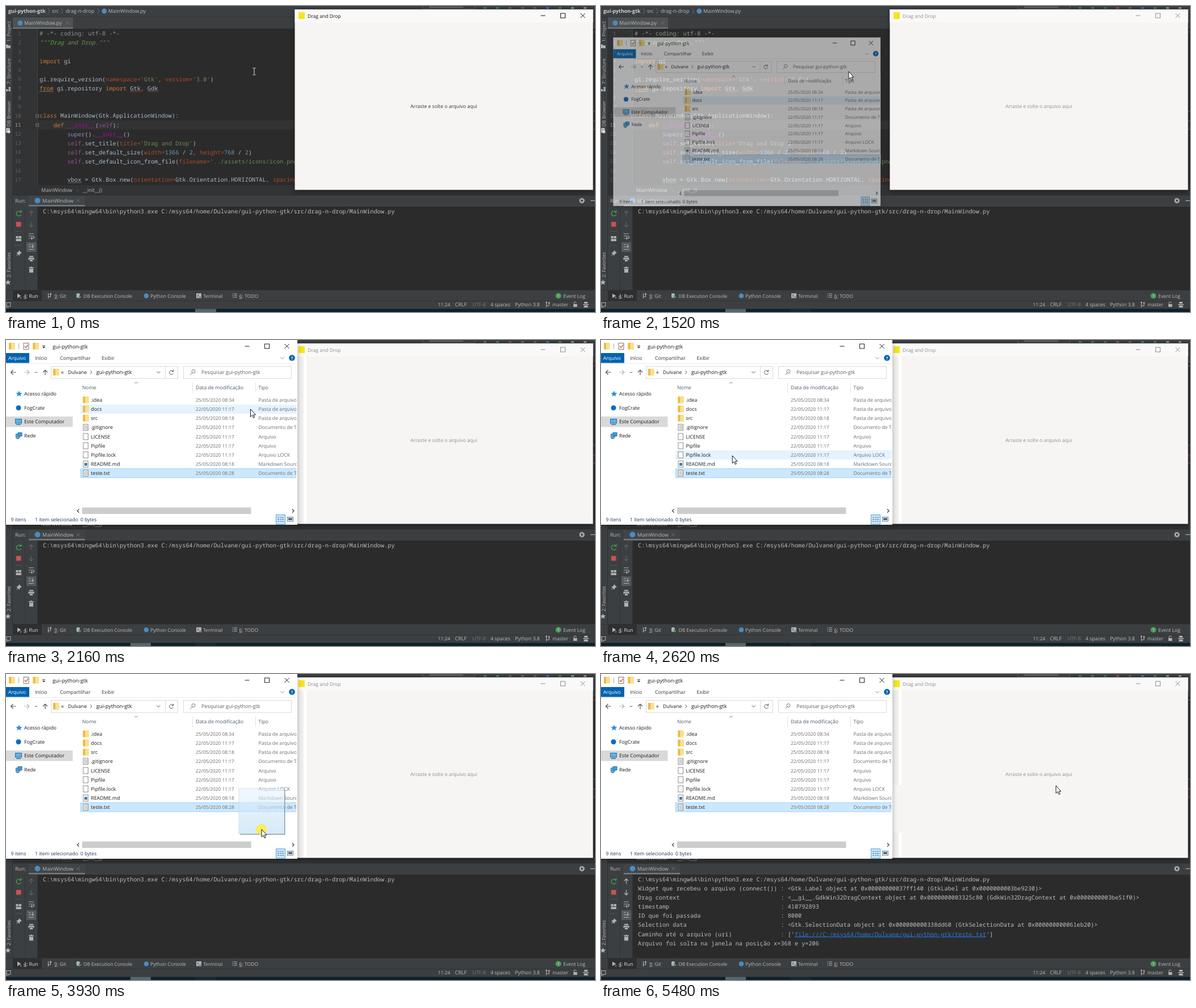
These frames come from a looping animation (1037 px wide and 540 px high, 6.56 s). An HTML page:

```html
<!DOCTYPE html>
<html lang="pt">
<head>
<meta charset="utf-8">
<title>Drag and Drop</title>
<style>
  html, body { margin: 0; width: 100%; height: 100%; overflow: hidden; background: #2b2b2b; }
  svg { display: block; width: 100vw; height: 100vh; }
  text { font-family: "Open Sans", "Noto Sans", sans-serif; text-rendering: geometricPrecision; white-space: pre; }
  .mono { font-family: "Noto Sans Mono", "DejaVu Sans Mono", monospace; }
</style>
</head>
<body>
<svg id="stage" viewBox="0 0 1037 540" xmlns="http://www.w3.org/2000/svg"></svg>
<script>
const LOOP = 6560;
const UI = '#bbbbbb', PANEL = '#3c3f41', EDITOR = '#2b2b2b', ICON = '#afb1b3';
const USER = 'Dulvane', CLOUD = 'FogCrate', RECORDER = 'PanelToReel';
const PROJECT = 'gui-python-gtk';
const MONO = 10.23, LINE = 16.12;

// Drawing helpers; text is placed by the vertical middle of its line.
const esc = s => s.replace(/&/g, '&amp;').replace(/</g, '&lt;').replace(/ /g, '\u00a0');
const rect = (x, y, w, h, fill, more = '') => `<rect x="${x}" y="${y}" width="${w}" height="${h}" fill="${fill}" ${more}/>`;
const box = (x, y, w, h, stroke, fill = 'none') => rect(x, y, w, h, fill, `stroke="${stroke}"`);
const dot = (x, y, r, fill) => `<circle cx="${x}" cy="${y}" r="${r}" fill="${fill}"/>`;
const line = (d, stroke, width = 1) => `<path d="${d}" fill="none" stroke="${stroke}" stroke-width="${width}"/>`;
const shape = (d, fill) => `<path d="${d}" fill="${fill}"/>`;
const text = (x, y, s, fill = UI, size = 8.75, more = '') =>
  `<text x="${x}" y="${y + 3.1}" fill="${fill}" font-size="${size}" ${more}>${esc(s)}</text>`;
const keyed = (x, y, s, fill, size) =>
  `<text x="${x}" y="${y + 3.1}" fill="${fill}" font-size="${size}"><tspan text-decoration="underline">${s[0]}</tspan>${esc(s.slice(1))}</text>`;
const upward = (y, s) =>
  `<text transform="translate(7.5 ${y}) rotate(-90)" fill="${UI}" font-size="8.4">${esc(s)}</text>`;

const INK = {
  c: 'fill="#909394"', d: 'fill="#629755" font-style="italic"', k: 'fill="#cc7832"', s: 'fill="#6a8759"',
  a: 'fill="#aa4926"', p: 'fill="#94558d"', m: 'fill="#b200b2"', b: 'fill="#8888c6"', n: 'fill="#6897bb"',
  l: 'fill="#287bde" text-decoration="underline"'
};
// Marked-up line: {k word} paints "word" with INK.k.
const code = (x, y, s, fill = '#a9b7c6') =>
  `<text class="mono" x="${x}" y="${y + 3.5}" fill="${fill}" font-size="${MONO}">` +
  s.split(/(\{\w [^}]*\})/).map(part => {
    const m = part.match(/^\{(\w) ([^}]*)\}$/);
    return m ? `<tspan ${INK[m[1]]}>${esc(m[2])}</tspan>` : esc(part);
  }).join('') + '</text>';

function wave(x, end, y, color) {
  let d = `M${x} ${y}`;
  for (let i = 1; x + i * 1.5 <= end; i++) d += `L${x + i * 1.5} ${y + (i % 2 ? -1.5 : 0)}`;
  return line(d, color, 0.8);
}

const folder = (x, y) => rect(x, y, 10.5, 11.5, '#f8d775') + rect(x, y, 4, 11.5, '#e9bb4a') + rect(x + 4, y + 1, 6.5, 10.5, '#fbe08c');
const page = (x, y) => box(x + 1, y, 8.5, 11, '#8b8b8b', '#fff');
const chevron = (x, y, c, r = 3) => line(`M${x - r} ${y - r / 2}l${r} ${r}l${r} ${-r}`, c);
const windowButtons = (x, y, c) => line(`M${x} ${y}h8`, c) +
  box(x + 35, y - 4, 8, 8, c) + line(`M${x + 70} ${y - 4}l8 8m0 -8l-8 8`, c);

const LINES = [
  '{c # -*- coding: utf-8 -*-}', '{d """Drag and Drop."""}', '', '{k import} gi', '',
  "gi.require_version({a namespace=}{s 'Gtk'}{k , }{a version=}{s '3.0'})",
  '{k from} gi.repository {k import} Gtk{k ,} Gdk', '', '',
  '{k class} MainWindow(Gtk.ApplicationWindow):',
  '    {k def} {m __init__}({p self}):',
  '        {b super}().{m __init__}()',
  "        {p self}.set_title({a title=}{s 'Drag and Drop'})",
  '        {p self}.set_default_size({a width=}{n 1366} / {n 2}{k , }{a height=}{n 768} / {n 2})',
  "        {p self}.set_default_icon_from_file({a filename=}{s '../assets/icons/icon.png'})",
  '',
  '        vbox = Gtk.Box.new({a orientation=}Gtk.Orientation.HORIZONTAL{k , }{a spacing=}{n 10})'
];

function editor() {
  let s = rect(12, 40, 1025, 293, EDITOR) + rect(12, 40, 43, 293, '#313335') + rect(12, 202, 1025, 16, '#323232');
  s += line('M55.5 40V316', '#47494b', 0.8);
  LINES.forEach((row, i) => {
    const y = 48.8 + i * LINE;
    s += `<text class="mono" x="26.5" y="${y + 3}" text-anchor="end" font-size="9.2" fill="${i === 10 ? '#a4a3a3' : '#606366'}">${i + 1}</text>`;
    if (row) s += code(59, y, row);
  });
  s += [194, 210].map(y => box(52.5, y - 2.5, 5, 5, '#6c6e70', EDITOR) + line(`M53.5 ${y}h3`, '#8a8c8e', 0.8)).join('');
  s += wave(59, 84, 151.5, '#a89f80') + wave(219, 237, 151.5, '#d0504c') + wave(250, 268, 151.5, '#d0504c') + wave(109, 133, 312.5, '#659c6b');
  s += rect(12, 316, 1025, 17, '#313335') + text(62, 325, 'MainWindow', UI, 9) + text(125, 325, '›', '#777', 9) + text(135, 325, '__init__()', UI, 8.9);
  return s + [45, 185, 202, 217].map(y => rect(1034, y, 3, 1.5, '#9e3a36')).join('');
}

function topBars() {
  let s = text(4, 9, PROJECT, '#d0d0d0', 8.95, 'font-weight="700"');
  s += text(81, 9, 'src') + text(105, 9, 'drag-n-drop', UI, 9.05) + dot(173, 9, 4.5, '#4b8bbe') + text(180, 9, 'MainWindow.py', UI, 8.95);
  s += [75, 98, 162].map(x => line(`M${x - 1} 4l3 5l-3 5`, '#77797b', 0.8)).join('');
  s += line('M0 19.5H1037', '#323232') + rect(12, 20, 106, 20, '#4e5254') + rect(12, 38, 106, 2.5, '#747a80');
  s += dot(25, 30, 4.5, '#4b8bbe') + text(32, 30, 'MainWindow.py', UI, 8.95) + line('M106 27.5l5 5m0 -5l-5 5', '#77797b', 0.8);
  s += box(733.5, -8, 92, 13, '#5e6062') + rect(745, 1, 60, 2, '#8a8c8e', 'opacity=".5"');
  const tips = ['#499c54', '#499c54', '#6e7072', '#c75450', '#6e7072', '#3592c4', '#499c54', ICON, ICON];
  return s + tips.map((c, i) => rect(841 + i * 22, 2, 5, 3, c, 'opacity=".7"')).join('');
}

function sideStripe() {
  let s = line('M11.5 20V501', '#323232') + upward(63, '1: Project') + upward(138, '7: Structure') + upward(213, 'DB Browser') + upward(479, '2: Favorites');
  s += shape('M0 68h3l1 1.5h4v5H0z', ICON) + rect(0, 147, 3.5, 3.5, ICON) + rect(4.5, 143, 3.5, 3.5, ICON) + rect(4.5, 147, 3.5, 3.5, ICON);
  s += rect(0, 215, 7, 9, ICON, 'rx="2"') + dot(5, 222, 2.5, '#e0e0e0');
  return s + shape('M3.5 482.5l1.4 3.4 3.6.2-2.8 2.4 1 3.6-3.2-2-3.2 2 1-3.6-2.8-2.4 3.6-.2z', ICON);
}

function runPanel() {
  let s = rect(12, 333, 1025, 1.5, '#292b2d') + rect(12, 334, 1025, 20, PANEL) + rect(40, 335, 99, 18, '#414547') + rect(40, 351, 99, 2.5, '#747a80');
  s += text(16, 343.5, 'Run:', UI, 9) + dot(55.5, 343.5, 5, '#4b8bbe') + text(64, 343.5, 'MainWindow', UI, 9) + line('M124.5 341l5 5m0 -5l-5 5', '#77797b', 0.8);
  s += `<circle cx="1014" cy="343.5" r="3" fill="none" stroke="${ICON}" stroke-width="2.2"/>` +
    `<circle cx="1014" cy="343.5" r="4.6" fill="none" stroke="${ICON}" stroke-dasharray="1.8 1.8"/>` + line('M1029 343.5h8', ICON, 1.2);
  s += rect(56, 354, 981, 147, EDITOR) + line('M33.5 356V501M55.5 354V501', '#323232') + line('M16 397.5h12M16 422.5h12', '#515456');
  s += line('M26 363.5a4.3 4.3 0 1 0 .5 4.5', '#499c54', 1.4) + shape('M23 364.5h4.5v-4.5z', '#499c54') + rect(18, 381, 8.5, 8.5, '#c75450');
  s += rect(17.5, 406, 4, 4, ICON) + rect(22.5, 406, 4.5, 4, ICON) + rect(17.5, 411, 9.5, 4, ICON);
  s += shape('M23 431l5 5-2 .5-2 2v2.5l-2.5-2.5-4 3 3-4-2.5-2.5h2.5l2-2z', ICON);
  s += `<g id="arrows" fill="none" stroke-width="1.3"><path d="M44.5 370.5v-9m-3.5 3.5l3.5-3.5 3.5 3.5M44.5 381v9m-3.5-3.5l3.5 3.5 3.5-3.5"/></g>`;
  s += line('M40 402h9M40 406h7.5a2 2 0 0 1 0 4h-3M40 410h2m4-2l-2 2 2 2', ICON, 1.2);
  s += rect(36, 417, 17, 17, '#55595c') + line('M40 421h4M40 425h4M40 429.5h9M47 420v6m-2-2l2 2 2-2', ICON, 1.2);
  s += rect(41, 441, 7, 2, ICON) + rect(39.5, 444, 10, 4, ICON) + rect(41.5, 447, 6, 4, ICON, `stroke="${PANEL}" stroke-width=".8"`);
  s += rect(40, 461, 9, 1.5, ICON) + rect(43, 460, 3, 1, ICON) + rect(41, 463.5, 7, 7, ICON);
  const path = `home/${USER}/${PROJECT}`;
  s += code(65, 362.3, `C:\\msys64\\mingw64\\bin\\python3.exe C:/msys64/${path}/src/drag-n-drop/MainWindow.py`, UI);
  const out = [
    ['Widget que recebeu o arquivo (connect())', '<Gtk.Label object at 0x00000000037ff140 (GtkLabel at 0x0000000003be9230)>'],
    ['Drag context', '<__gi__.GdkWin32DragContext object at 0x0000000003325c80 (GdkWin32DragContext at 0x0000000003be51f0)>'],
    ['timestamp', '410792893'],
    ['ID que foi passada', '8000'],
    ['Selection data', '<Gtk.SelectionData object at 0x000000000338dd60 (GtkSelectionData at 0x000000000061eb20)>'],
    ['Caminho até o arquivo (uri)', `['{l file:///C:/msys64/${path}/teste.txt}']`]
  ].map(([name, value]) => `${name.padEnd(41)}: ${value}`);
  out.push('Arquivo foi solta na janela na posição x=368 e y=206');
  return s + '<g id="output">' + out.map((row, i) => code(65, 362.3 + (i + 1) * LINE, row, UI)).join('') + '</g>';
}

function bottomBars() {
  let s = line('M0 501.5H1037M0 520.5H1037', '#323232') + rect(12, 502, 51, 18, '#2d2f30');
  s += shape('M20 507.5l6.5 4-6.5 4z', ICON) + dot(26, 515, 1.5, '#499c54') + keyed(31, 511.5, '4: Run', '#e0e0e0', 8.7);
  s += line('M74.5 507v9M74.5 513h4v-5M77 509l1.5-2 1.5 2', ICON, 1.2) + keyed(85, 511.5, '9: Git', UI, 8.6);
  s += rect(124, 507, 6, 8, ICON, 'rx="2"') + shape('M128 510.5l5 3-5 3z', '#499c54') + text(136.5, 511.5, 'DB Execution Console', UI, 8.45);
  s += dot(247, 511.5, 4.3, '#4b8bbe') + text(254, 511.5, 'Python Console', UI, 8.64);
  s += rect(335, 507, 9, 8.5, ICON) + line('M337 509l2 2-2 2m3.5 .5h2.5', PANEL) + text(347, 511.5, 'Terminal', UI, 8.5);
  s += line('M398.5 508h1.5m1 0h6M398.5 511h1.5m1 0h6M398.5 514h1.5m1 0h6', ICON, 1.2) + keyed(410.5, 511.5, '6: TODO', UI, 8.6);
  s += dot(972.5, 511.5, 5, '#499c54') + text(970.7, 511.2, '1', '#fff', 7) + text(981, 511.5, 'Event Log', UI, 8.64);
  s += box(1, 523.5, 7, 6.5, ICON) + line('M0 527v5h5', ICON, 0.8);
  s += text(760.5, 527, '11:24', UI, 8.5) + text(790.5, 527, 'CRLF', UI, 9.1) + text(821, 527, 'UTF-8', '#777', 8.9);
  s += text(853, 527, '4 spaces', UI, 8.75) + text(896, 527, 'Python 3.8', UI, 8.85) + text(962, 527, 'master', UI, 8.5);
  s += line('M951.5 522.5v9M951.5 529h4.5v-5', ICON, 1.1) + dot(951.5, 523, 1.4, ICON) + dot(956, 524, 1.4, ICON);
  s += rect(999, 526, 6.5, 5, ICON) + line('M1000 526v-2a2 2 0 0 1 4 0', ICON) + shape('M1016 526h10v1.5h-10zM1018 522h6v3h-6zM1018 528.5h6l1 3.5h-8z', ICON);
  s += rect(0, 534.5, 1037, 6, '#10202b') + rect(333, 534.5, 37, 6, '#56646c', 'id="taskA"') + rect(219, 534.5, 36, 6, '#56646c', 'id="taskB"');
  return s + text(965, 542.5, '08:28', '#d8d8d8', 8.6);
}

function gtkWindow() {
  return rect(508.5, 6, 525, 318.5, '#f6f5f4') + rect(508.5, 6, 525, 23, '#faf9f9') + rect(515, 11, 11, 12, '#f7e51e') +
    `<g id="gtkTitle">${text(531, 17.5, 'Drag and Drop', 'currentColor', 8.55)}${windowButtons(941.5, 17, 'currentColor')}</g>` +
    `<g id="gtkLabel">${text(712, 176.5, 'Arraste e solte o arquivo aqui', 'currentColor', 8.62)}</g>`;
}

const FILES = [
  ['.idea', '25/05/2020 08:34', 'Pasta de arquivos'], ['docs', '22/05/2020 11:17', 'Pasta de arquivos'],
  ['src', '25/05/2020 08:18', 'Pasta de arquivos'], ['.gitignore', '22/05/2020 11:17', 'Documento de Texto'],
  ['LICENSE', '22/05/2020 11:17', 'Arquivo'], ['Pipfile', '22/05/2020 11:17', 'Arquivo'],
  ['Pipfile.lock', '22/05/2020 11:17', 'Arquivo LOCK'], ['README.md', '25/05/2020 08:18', 'Markdown Source'],
  ['teste.txt', '25/05/2020 08:28', 'Documento de Texto']
];
const rowY = i => 105.8 + i * 16.15;

function fileIcon(i, y) {
  if (i < 3) return folder(135.5, y - 6);
  let s = page(135, y - 5.5);
  if (i === 3 || i === 8) s += line(`M137.5 ${y - 3}h6m-6 2h6m-6 2h6m-6 2h6`, '#8f8f8f', 0.8);
  if (i === 7) s += rect(138, y - 2, 5, 5, '#3b7fa8');
  return s;
}

function explorer() {
  const dark = '#1a1a1a', gray = '#6d6d6d', edge = '#d9d9d9';
  let s = rect(-3, 0, 516, 326, '#fff');
  s += folder(5, 5) + line('M22.5 6v10', '#aaa') + box(31, 5.5, 9, 11, '#777', '#fff') + line('M33 11l2 2.5 4-5', '#d2552d', 1.3) + folder(47.5, 5);
  s += line('M64 10h5', dark) + shape('M64 12h5l-2.5 2.5z', dark) + text(82, 11.5, PROJECT, dark, 9.2) + windowButtons(420.5, 11, dark);
  s += rect(-3, 23, 44, 17.5, '#0063b1') + text(4, 32, 'Arquivo', '#fff', 8.6) + text(51, 32, 'Início', '#333', 8.7) + text(95, 32, 'Compartilhar', '#333', 8.7) + text(168.5, 32, 'Exibir', '#333', 8.7);
  s += chevron(486.5, 32, '#888') + dot(503.5, 31.5, 5.3, '#0063b1') + text(501.7, 31.5, '?', '#fff', 7.5, 'font-weight="700"') + line('M0 41.5H513', '#ececec');
  s += line('M17.5 57h-9m4-4l-4 4 4 4', '#555', 1.2) + line('M32 57h9m-4-4l4 4-4 4', '#b5b5b5', 1.2) + chevron(53, 57, '#555', 2) + line('M69 62v-9m-4 4l4-4 4 4', '#555', 1.2);
  s += box(79.5, 46.5, 223, 21.5, edge) + line('M280.5 47v21', edge) + folder(83, 51) + text(97, 56.5, '«', dark, 9.5) + text(109, 56.8, USER, dark, 8.7);
  s += line('M148.5 54l2.5 3-2.5 3', '#555') + text(159, 56.8, PROJECT, dark, 9.25) + chevron(268.5, 57, '#555') + line('M294.5 55.5a3.6 3.6 0 1 0 .2 3M294.7 52.5v3.2h-3', '#555');
  s += box(312.5, 46.5, 190, 21.5, edge) + '<circle cx="330" cy="55.5" r="3" fill="none" stroke="#777"/>' + line('M327.8 58l-3.3 3.5', '#777') + text(344, 56.8, 'Pesquisar ' + PROJECT, '#5f5f5f', 8.95);
  s += line('M226.5 76.5l2.5-2 2.5 2', '#777') + line('M328.5 75v18M439.5 75v18', '#e2e2e2');
  s += text(134, 83.7, 'Nome', '#4c5a6a', 8.75) + text(334, 83.7, 'Data de modificação', '#4c5a6a', 8.8) + text(444.5, 83.7, 'Tipo', '#4c5a6a', 8.7);
  s += rect(-3, 135, 120.5, 18.5, '#d9d9d9') + shape('M23 89.5l1.6 3.7 4 .2-3.2 2.5 1.2 3.9-3.6-2.3-3.8 2.3 1.3-3.9-3.2-2.5 4-.2z', '#2f8ad8');
  s += dot(22, 119.8, 4.5, '#0a6cc4') + box(16.5, 139.5, 11, 7.5, '#2b6f9e', '#58b4e8') + rect(18, 148.5, 8, 1.5, '#4a6a80');
  s += box(17.5, 166, 7, 6, '#2b6f9e', '#58b4e8') + box(21, 163.5, 7, 6, '#2b6f9e', '#3f9bd8') + rect(18, 173, 5, 1.5, '#4a6a80');
  [['Acesso rápido', 95], [CLOUD, 119.8], ['Este Computador', 144.3], ['Rede', 168.8]].forEach(([name, y]) => s += text(32, y, name, dark, 8.73));
  s += rect(131, 0, 381, 16.15, '#e5f3ff', 'id="hover"') + box(131.5, rowY(8) - 8, 384, 16, '#99d1ff', '#cce8ff');
  FILES.forEach(([name, date, type], i) => {
    const y = rowY(i);
    s += fileIcon(i, y) + text(149.5, y, name, dark, 8.8) + text(334, y, date, gray, 8.37) + text(444.5, y, type, gray, 8.7);
  });
  s += rect(511.5, 70, 1.5, 220, '#fff');
  s += rect(134, 295.5, 297.5, 11.5, '#cdcdcd') + line('M128.5 298.5l-3 3 3 3M504 298.5l3 3-3 3', '#333', 1.2);
  s += text(8.5, 317.3, '9 itens', '#1e395b', 8.7) + text(51, 317.3, '1 item selecionado', '#1e395b', 8.68) + text(131, 317.3, '0 bytes', '#1e395b', 8.6);
  s += box(475.5, 308.5, 16, 16.5, '#4ba3dc', '#cce8ff') + line('M478 313h3m1.5 0h2.5m1 0h3M478 316.5h3m1.5 0h2.5m1 0h3M478 320h3m1.5 0h2.5m1 0h3', '#44607a', 1.2);
  return s + box(495.5, 312.5, 10, 7.5, '#777', '#fff') + rect(497, 314, 7, 4, '#3d6f96');
}

function switcher() {
  const title = (x, s, size) => text(x, 206.5, s, '#fff', size);
  const thumb = (id, x, y, scale) => `<use href="#${id}" transform="translate(${x} ${y}) scale(${scale})"/>`;
  let s = rect(80, 174.5, 876.5, 160, '#121212', 'opacity=".84"') + rect(264, 193, 158.5, 124.5, '#0c0c0c', 'stroke="#fff" stroke-width="2"');
  s += rect(102, 197, 16, 17, '#f7e51e') + title(123, 'Drag and Drop', 8.7) + thumb('gtk', -53, 216.7, 0.3);
  s += folder(270, 200) + title(289, PROJECT, 9.25) + thumb('files', 269, 218.5, 0.291);
  s += rect(429, 198, 16, 16, '#21d789') + title(450, PROJECT + ' – MainWindow....', 9) + thumb('ide', 428.5, 219.5, 0.1736);
  s += rect(618, 198, 16, 15, '#e6e3ea') + title(639, RECORDER, 8.6) + rect(617.5, 218.5, 170, 95.5, '#fff') + rect(618.5, 222.5, 168, 87, '#3a3a3a') + text(619, 220.5, RECORDER, '#777', 3);
  s += rect(740, 311, 45, 2, '#999', 'opacity=".6"');
  s += rect(798, 198, 16, 15, '#e6e3ea') + title(819, RECORDER + ' - Editor', 8.6) + rect(797.5, 218.5, 138, 95, '#fff');
  for (let i = 0; i < 6; i++) {
    const v = 238 - i * 14;
    s += rect(797.5, 236.5 + i * 12.8, 138, 13, `rgb(${v},${v},${v})`);
  }
  return s + text(798.5, 230, RECORDER + ' - Editor', '#8f8f8f', 9.9) + rect(856, 268, 20, 16, '#e6e3ea');
}

const stage = document.getElementById('stage');
stage.innerHTML = `
  <defs>
    <filter id="soft" x="-20%" y="-20%" width="140%" height="140%"><feGaussianBlur stdDeviation="5"/></filter>
    <linearGradient id="veil" x1="0" y1="0" x2="0" y2="1">
      <stop offset="0" stop-color="#e8f4fc" stop-opacity=".6"/><stop offset="1" stop-color="#b8dcf4" stop-opacity=".6"/>
    </linearGradient>
    <clipPath id="frame"><rect x="-3" width="516" height="326"/></clipPath>
    <g id="ide">${rect(0, 0, 1037, 540, PANEL)}${topBars()}${editor()}${sideStripe()}${runPanel()}${bottomBars()}</g>
    <g id="gtk">${gtkWindow()}</g>
    <g id="files" clip-path="url(#frame)">${explorer()}</g>
  </defs>
  <use href="#ide"/>
  ${rect(509, 9, 524, 318, '#000', 'opacity=".45" filter="url(#soft)"')}
  <use href="#gtk"/>
  <g id="edgeStrip">${rect(513, 29, 11, 295, '#f1f0ef')}${rect(524, 29, 5, 295, '#fff')}${rect(513, 196, 16, 84, '#f6f5f4', 'id="wiped"')}</g>
  <g id="explorer">${rect(-3, 3, 516, 326, '#000', 'opacity=".3" filter="url(#soft)"')}<use href="#files"/></g>
  <g id="switcher">${switcher()}</g>
  <g id="ibeam">${line('M434.5 109.5h2l.5 .5 .5-.5h2M437 110v11M434.5 121.5h2l.5-.5 .5 .5h2', '#dcdcdc')}</g>
  <g id="pointer">
    <g id="ghost">${rect(-40, -72, 80, 80, 'url(#veil)', 'stroke="#c3d3df" stroke-width=".6"')}${line('M-38 8.8H40.8V-70', '#7d8b96', 1.2)}</g>
    <circle id="press" cx="-.5" cy="0" r="9.3" fill="#ffee33" opacity=".82"/>
    <path d="M0 0V13.5L3 10.7 5.2 15.5 7.2 14.6 5.1 10H9Z" fill="#fff" stroke="#000" stroke-width=".9"/>
    <g id="plus">${box(6.5, 14.5, 9, 9, '#111', '#fff')}${line('M11 16.5v5M8.5 19h5', '#111', 1.1)}</g>
  </g>`;

const el = {};
stage.querySelectorAll('[id]').forEach(node => el[node.id] = node);
const show = (node, on) => node.setAttribute('display', on ? 'inline' : 'none');
const mix = (a, b, p) => a + (b - a) * p;

// Progress 0..1 that advances in n held poses from start to end.
function stepped(t, start, end, n) {
  const k = Math.floor((t - start) / (end - start) * (n - 1) + 0.01);
  return Math.max(0, Math.min(n - 1, k)) / (n - 1);
}

function pointerAt(t) {
  if (t < 2160) return [436, 115.6];
  if (t < 2850) {
    const p = stepped(t, 2160, 2780, 9), e = p * p * (3 - 2 * p);
    return [mix(430.5, 139, e), mix(122, 242, e)];
  }
  if (t < 3320) {
    const p = stepped(t, 2850, 3090, 4);
    return [mix(140, 146, p), mix(242, 239, p)];
  }
  if (t < 4010) {
    const p = stepped(t, 3320, 3930, 9);
    return [mix(146, 450, p ** 2.3), mix(239, 274, p ** 4)];
  }
  const e = 1 - (1 - stepped(t, 4010, 4470, 7)) ** 2;
  return [mix(517, 801, e), mix(264, 197, e)];
}

// Opening window: start time, scale, opacity.
const OPENING = [[1440, 0.86, 0.2], [1520, 0.913, 0.6], [1610, 0.985, 0.93], [1690, 1, 1]];

function render(t) {
  const [x, y] = pointerAt(t);
  show(el.ibeam, t < 910);
  show(el.pointer, t >= 910);
  el.pointer.setAttribute('transform', `translate(${x} ${y})`);
  show(el.press, t >= 3320 && t < 5250);
  show(el.ghost, t >= 3390 && t < 4010);
  show(el.plus, t >= 4010 && t < 5250);

  show(el.switcher, t >= 980 && t < 1440);
  const pose = OPENING.filter(o => t >= o[0]).pop();
  show(el.explorer, !!pose);
  if (pose) {
    const away = (1 - pose[1]) / 0.087;
    el.explorer.setAttribute('transform', `translate(${24 * away} ${55.3 * away}) scale(${pose[1]})`);
    el.explorer.setAttribute('opacity', pose[2]);
  }
  show(el.edgeStrip, t >= 1690);
  show(el.wiped, t >= 4010);

  const row = Math.floor((y - 97.7) / 16.15);
  show(el.hover, t >= 1520 && t < 3320 && row < 8);
  el.hover.setAttribute('y', rowY(row) - 8);

  el.gtkTitle.setAttribute('color', t < 910 ? '#111' : '#8c8c8c');
  el.gtkLabel.setAttribute('color', t < 910 ? '#2e3436' : '#8b8e8f');
  el.taskA.setAttribute('opacity', t < 910 ? 1 : 0.12);
  show(el.taskB, t >= 1440);
  show(el.output, t >= 5480);
  el.arrows.setAttribute('stroke', t >= 5480 ? ICON : '#5d6062');
}

const begin = performance.now();
function tick() {
  render((performance.now() - begin) % LOOP);
  requestAnimationFrame(tick);
}
render(0);
requestAnimationFrame(tick);
</script>
</body>
</html>
```
